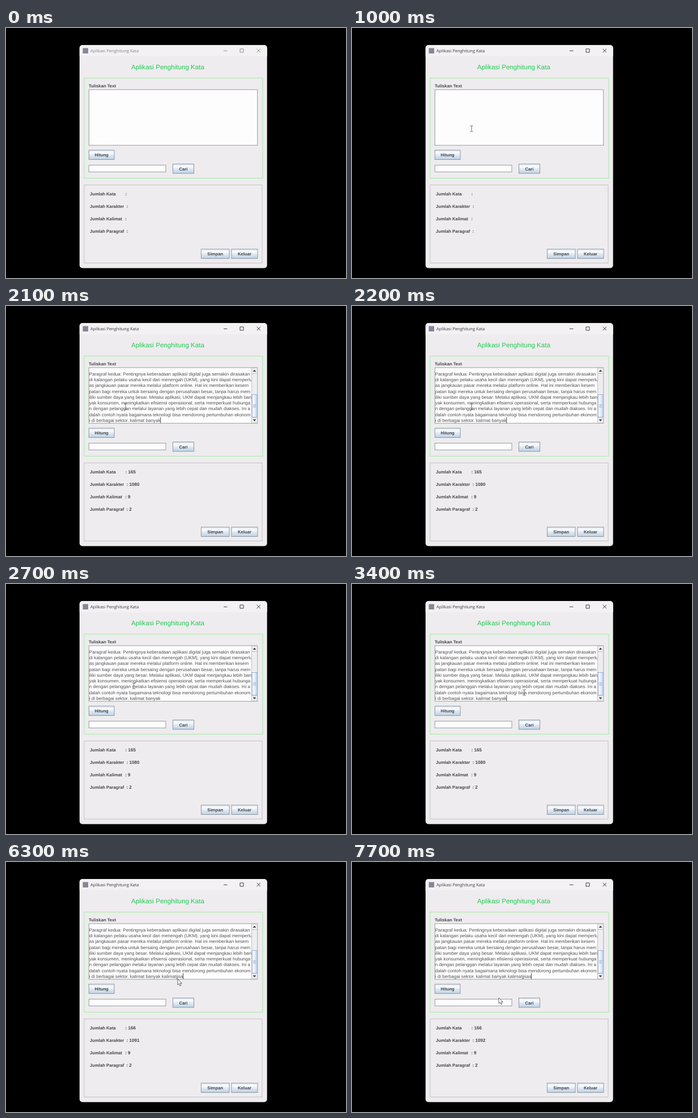
Write an HTML page that moves like this. It is 600x442 px and loops after 8000 ms.

```html
<!DOCTYPE html>
<html lang="id">
<head>
<meta charset="utf-8">
<title>Aplikasi Penghitung Kata</title>
<style>
  html, body { margin: 0; width: 100%; height: 100%; overflow: hidden; background: #000; }
  svg { display: block; }
  text {
    font-family: "Liberation Sans", Arial, sans-serif;
    text-rendering: geometricPrecision;
    white-space: pre;
  }
  .bar { font: 7.45px "Open Sans", "Noto Sans", sans-serif; }
  .head { font-size: 11.6px; fill: #22cb55; }
  .label, .value { font-size: 7.7px; font-weight: 700; fill: #444446; }
  .value { font-size: 8px; }
  .mid { text-anchor: middle; }
  .body { font-size: 8.05px; fill: #505052; }
  .box { fill: #fefdfe; stroke: #979da4; }
  .button { fill: url(#ocean); stroke: #8b97a4; }
  .controls { fill: none; stroke-width: .9; }
  .group { fill: none; }
</style>
</head>
<body>
<svg width="600" height="442" viewBox="0 0 600 442">
  <defs>
    <linearGradient id="ocean" x2="0" y2="1">
      <stop stop-color="#e2ebf4"/>
      <stop offset=".3" stop-color="#fafbfd"/>
      <stop offset=".5" stop-color="#e3ebf4"/>
      <stop offset="1" stop-color="#bdd1e5"/>
    </linearGradient>
    <linearGradient id="thumb">
      <stop stop-color="#d5e3f1"/>
      <stop offset=".3" stop-color="#f6faff"/>
      <stop offset="1" stop-color="#bed2e7"/>
    </linearGradient>
  </defs>

  <rect width="600" height="442"/>
  <rect x="129.8" y="30.3" width="330.9" height="394.2" rx="5" fill="#eeecee"/>
  <path d="M129.8 50V35.3a5 5 0 0 1 5-5H455.7a5 5 0 0 1 5 5V50Z" fill="#f4f1f5"/>
  <rect x="135.5" y="35.5" width="9.5" height="9.5" fill="#858795"/>
  <g id="chrome">
    <text class="bar" x="149" y="43">Aplikasi Penghitung Kata</text>
    <path class="controls" stroke="currentColor" d="M384 40.3H390.5M413 37H419V43H413ZM442.5 36.8L449 43.2M449 36.8L442.5 43.2"/>
  </g>

  <text class="head" x="221" y="73.3">Aplikasi Penghitung Kata</text>
  <rect class="group" x="138" y="88.5" width="315" height="177" stroke="#a2eca4"/>
  <rect class="group" x="138" y="277.5" width="314" height="138" stroke="#c4c1c6"/>
  <text class="label" x="146" y="104.7">Tuliskan Text</text>
  <rect class="box" x="146.3" y="109" width="297.4" height="98.3"/>
  <rect class="box" x="146.3" y="242.5" width="135.7" height="12"/>
  <g id="buttons"></g>
  <g id="counts"></g>

  <g id="filled">
    <g id="lines"></g>
    <rect id="caret" y="196.5" width=".9" height="10.3" fill="#333"/>
    <rect x="433.6" y="109.4" width="10" height="97.5" fill="#efedf0" stroke="#aeb3ba" stroke-width=".8"/>
    <path d="M433.5 119.5H443.5M433.5 197H443.5" stroke="#aeb3ba" stroke-width=".8"/>
    <path d="M435.7 116L438.5 112.8L441.3 116ZM435.7 200.5L438.5 203.7L441.3 200.5Z" fill="#333"/>
    <rect x="434" y="156.5" width="9.3" height="40" fill="url(#thumb)" stroke="#8ba3cb" stroke-width=".8"/>
    <path d="M436 174.5H441M436 176.7H441M436 178.9H441" stroke="#8ba3cb" stroke-width=".8"/>
  </g>

  <path id="beam" d="M-2.5 -5H-.6L0 -4.5L.6 -5H2.5M0 -4.5V4.5M-2.5 5H-.6L0 4.5L.6 5H2.5" fill="none" stroke="#505050" stroke-width=".85"/>
  <path id="arrow" d="M0 0V10.3L2.4 8.1L4.1 12L5.9 11.2L4.2 7.5H7.4Z" fill="#fff" stroke="#444" stroke-width=".8" stroke-linejoin="round"/>
</svg>

<script>
const LOOP = 8000, FOCUS = 900, PASTE = 2100;
const paragraph = [
  "Paragraf kedua: Pentingnya keberadaan aplikasi digital juga semakin dirasakan",
  "di kalangan pelaku usaha kecil dan menengah (UKM), yang kini dapat memperlu",
  "as jangkauan pasar mereka melalui platform online. Hal ini memberikan kesem",
  "patan bagi mereka untuk bersaing dengan perusahaan besar, tanpa harus mem",
  "iliki sumber daya yang besar. Melalui aplikasi, UKM dapat menjangkau lebih ban",
  "yak konsumen, meningkatkan efisiensi operasional, serta memperkuat hubunga",
  "n dengan pelanggan melalui layanan yang lebih cepat dan mudah diakses. Ini a",
  "dalah contoh nyata bagaimana teknologi bisa mendorong pertumbuhan ekonom",
  "i di berbagai sektor. kalimat banyak"
];
const typed = " kalimatjjsas";
const keyTimes = [4700, 4800, 4900, 5000, 5100, 5300, 5300, 5500, 5800, 6000, 6100, 6300, 6700];
// time, x, y
const path = [[0, 211, 178], [2500, 211, 178], [3300, 304, 192], [3650, 304, 192],
              [4000, 303, 207], [7050, 303, 207], [7700, 259, 240]];

const $ = id => document.getElementById(id);

function add(parent, tag, attrs, content = "") {
  const el = document.createElementNS("http://www.w3.org/2000/svg", tag);
  for (const key in attrs) el.setAttribute(key, attrs[key]);
  el.textContent = content;
  return $(parent).appendChild(el);
}

for (const [name, x, y, width] of [["Hitung", 146.3, 216, 44.7], ["Cari", 294.5, 240.5, 37],
                                   ["Simpan", 344.5, 391, 49.5], ["Keluar", 398, 391, 46]]) {
  add("buttons", "rect", { class: "button", x, y, width, height: 16.5 });
  add("buttons", "text", { class: "label mid", x: x + width / 2, y: y + 11.3 }, name);
}

const values = [["Kata", 210.6], ["Karakter", 212.7], ["Kalimat", 210.2], ["Paragraf", 212.4]].map(([name, x], i) => {
  const y = 296 + i * 22;
  add("counts", "text", { class: "label", x: 148, y }, "Jumlah " + name);
  return add("counts", "text", { class: "value", x, y });
});

const lines = paragraph.map((line, i) =>
  add("lines", "text", { class: "body", x: 146.8, y: 122.7 + i * 10.27 }, line));
const lastLine = lines[lines.length - 1];

const setText = (el, s) => { if (el.textContent !== s) el.textContent = s; };
const show = (el, on) => el.setAttribute("visibility", on ? "visible" : "hidden");

function pointer(t) {
  let i = 1;
  while (i < path.length - 1 && t > path[i][0]) i++;
  const [t0, x0, y0] = path[i - 1], [t1, x1, y1] = path[i];
  const p = Math.min(1, (t - t0) / (t1 - t0));
  const ease = p * p * (3 - 2 * p);
  return [x0 + (x1 - x0) * ease, y0 + (y1 - y0) * ease];
}

function caretOn(t) {
  if (t < 4700) return t < 2500 || t % 1000 < 500;
  const lastKey = keyTimes.filter(k => k <= t).pop();
  return (t - lastKey) % 1000 < 500;
}

function draw(t) {
  const active = t >= FOCUS, filled = t >= PASTE;
  $("chrome").setAttribute("fill", active ? "#3b393d" : "#858288");
  $("chrome").setAttribute("color", active ? "#2b2a2d" : "#858288");

  const n = keyTimes.filter(k => k <= t).length;
  // the counters trail the text by one key
  const counted = Math.max(0, n - 1);
  const counts = [counted > 1 ? 166 : 165, 1080 + counted, 9, 2];
  values.forEach((el, i) => setText(el, filled ? ": " + counts[i] : ":"));

  show($("filled"), filled);
  setText(lastLine, paragraph[paragraph.length - 1] + typed.slice(0, n));
  $("caret").setAttribute("x", 146.6 + lastLine.getComputedTextLength());
  show($("caret"), filled && caretOn(t));

  const [x, y] = pointer(t);
  const inText = y < 205;
  for (const id of ["beam", "arrow"]) {
    $(id).setAttribute("transform", `translate(${x} ${y})`);
    show($(id), active && (id === "beam") === inText);
  }
}

const start = performance.now();
function tick() {
  draw((performance.now() - start) % LOOP);
  requestAnimationFrame(tick);
}
tick();
</script>
</body>
</html>
```
